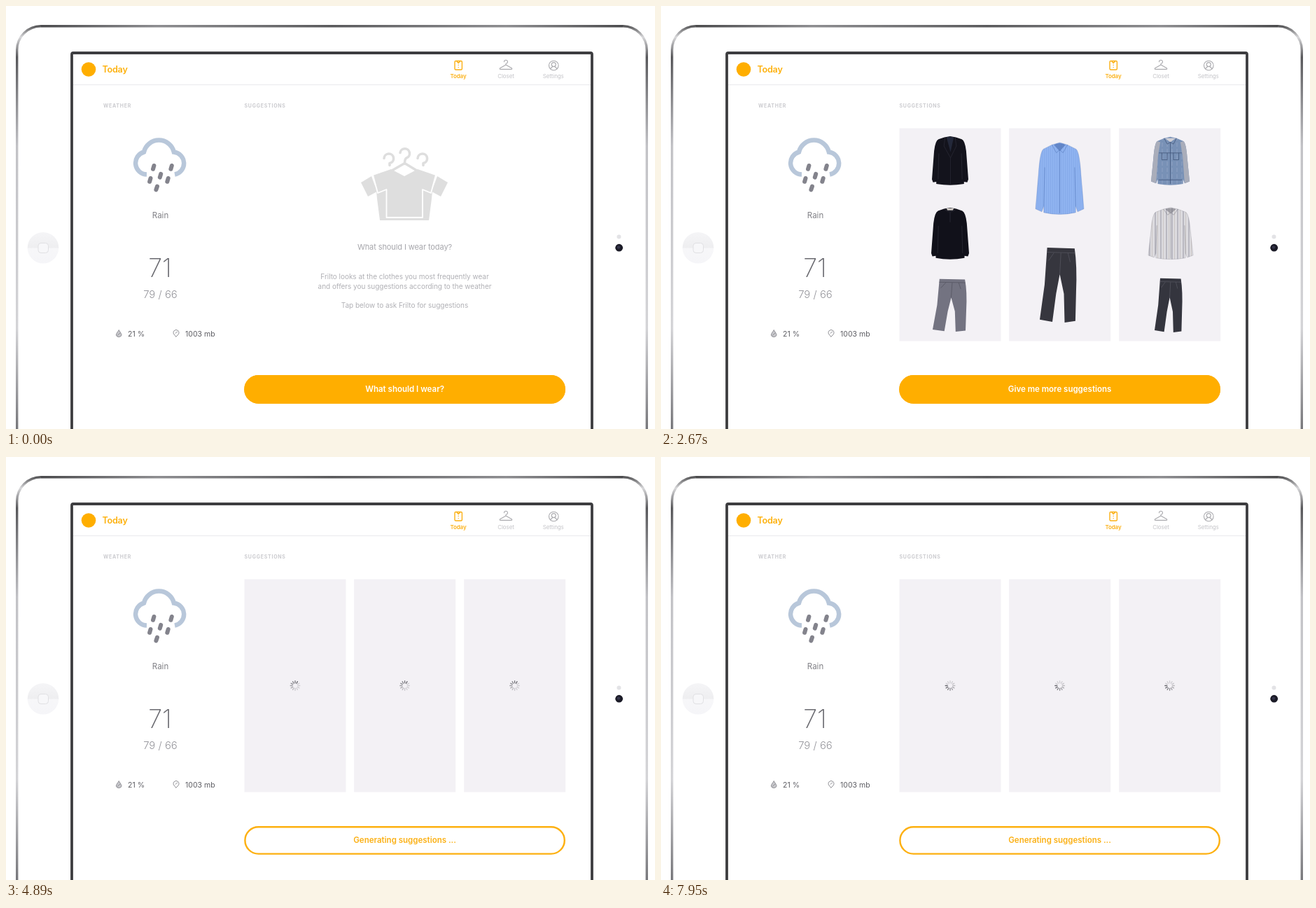
An HTML page for the animation above (7980 ms loop, 927 by 604 pixels).

```html
<!DOCTYPE html>
<html>
<head>
<meta charset="utf-8">
<style>
html, body { margin: 0; width: 100%; height: 100%; overflow: hidden; background: #fff; }
svg { display: block; width: 927px; height: 604px; font-family: Inter, Roboto, sans-serif; }
.mid { text-anchor: middle; }
.head { font-size: 7px; font-weight: 700; letter-spacing: .75px; fill: #cbcbcf; }
.tab { font-size: 8px; letter-spacing: -.1px; fill: #c4c4c8; }
.note { font-size: 10px; letter-spacing: -.03px; fill: #b0b0b5; }
.label { font-size: 11.5px; font-weight: 600; }
.stat { font-size: 10.5px; fill: #5c5c62; }
.line { fill: none; stroke-linecap: round; stroke-linejoin: round; }
</style>
</head>
<body>
<svg viewBox="0 0 927 604">
  <defs>
    <linearGradient id="side" x1="0" y1="27" x2="0" y2="604" gradientUnits="userSpaceOnUse">
      <stop offset="0" stop-color="#4a4a4c"/><stop offset=".03" stop-color="#d8d8da"/>
      <stop offset=".08" stop-color="#58585b"/><stop offset=".3" stop-color="#c2c2c6"/>
      <stop offset=".75" stop-color="#d4d4d7"/><stop offset="1" stop-color="#77777b"/>
    </linearGradient>
    <linearGradient id="edge">
      <stop offset="0" stop-color="#4a4a4c"/><stop offset=".2" stop-color="#8d8d90"/>
      <stop offset=".5" stop-color="#59595b"/><stop offset=".8" stop-color="#8d8d90"/>
      <stop offset="1" stop-color="#4a4a4c"/>
    </linearGradient>
    <linearGradient id="home" x2="0" y2="1">
      <stop offset="0" stop-color="#f5f5f7"/><stop offset=".5" stop-color="#eeeef0"/>
      <stop offset=".51" stop-color="#f7f7f9"/><stop offset="1" stop-color="#f5f5f8"/>
    </linearGradient>
    <pattern id="pin" width="3" height="8" patternUnits="userSpaceOnUse">
      <path fill="#8fb3f0" d="M0 0h3v8H0z"/><path fill="#86abea" d="M0 0h1v8H0z"/>
    </pattern>
    <pattern id="pale" width="8" height="8" patternUnits="userSpaceOnUse">
      <path fill="#dcdbdf" d="M0 0h8v8H0z"/><path fill="#b9b8c1" d="M1 0h2v8H1z"/><path fill="#cbc6c5" d="M5 0h1v8H5z"/>
    </pattern>
    <pattern id="blue" width="5" height="8" patternUnits="userSpaceOnUse">
      <path fill="#dfe6f2" d="M0 0h5v8H0z"/><path fill="#6f8fc6" d="M0 0h2.2v8H0z"/>
    </pattern>
    <pattern id="plaid" width="13" height="13" patternUnits="userSpaceOnUse">
      <path fill="#c04f57" d="M0 0h13v13H0z"/>
      <path fill="#59506f" opacity=".35" d="M0 0h4v13H0zM0 0h13v4H0zM8 0h1v13H8zM0 8h13v1H0z"/>
    </pattern>
    <pattern id="dots" width="13" height="14" patternUnits="userSpaceOnUse">
      <path fill="#f8f9fe" d="M0 0h13v14H0z"/><circle cx="3" cy="4" r="1.4" fill="#47547c"/>
      <circle cx="9" cy="10" r="1.3" fill="#a98a74"/>
    </pattern>
    <pattern id="denim" width="7" height="9" patternUnits="userSpaceOnUse">
      <path fill="#7891b6" d="M0 0h7v9H0z"/><path fill="#8399bc" d="M1 0h2v6H1z"/>
    </pattern>
  </defs>

  <g fill="none" stroke-width="3.4">
    <path stroke="url(#side)" d="M15.7 610V63A34.3 34.3 0 0 1 50 28.7M915.3 610V63A34.3 34.3 0 0 0 881 28.7"/>
    <path stroke="url(#edge)" d="M50 28.7H465.5V28.71H881"/>
  </g>
  <circle cx="53" cy="345.3" r="22.3" fill="url(#home)"/>
  <rect x="46" y="338.5" width="14.5" height="14" rx="4" fill="#f7f7f9" stroke="#e0e0e3"/>
  <circle cx="875.5" cy="329.5" r="3" fill="#e3e3e6"/>
  <circle cx="875.7" cy="345.2" r="5.4" fill="#1b1b27"/>
  <circle cx="875" cy="344.5" r="2.2" fill="#34344a"/>
  <rect x="94" y="67" width="743" height="560" rx="2" fill="#fff" stroke="#3d3d40" stroke-width="3.8"/>
  <path stroke="#eaeaec" d="M96 112.5H835"/>

  <circle cx="118" cy="90.5" r="10.3" fill="#ffae00"/>
  <text x="137.5" y="95" font-size="12.6" font-weight="600" letter-spacing="-.25" fill="#fdb10d">Today</text>
  <g class="line" stroke="#fbb014" stroke-width="1.4">
    <rect x="641" y="78.5" width="10.4" height="12.5" rx="1.5"/>
    <path d="M643.8 78.7L646.2 81.5 648.6 78.7M646.2 84.2v.2M646.2 87.4v.2"/>
  </g>
  <g class="line" stroke="#aaaaae" stroke-width="1.1">
    <path d="M711.5 79.8A2.5 2.5 0 1 1 714 82.2V84L705.6 88.8Q704.5 90.4 706.5 90.4H721.5Q723.5 90.4 722.4 88.8L714 84"/>
    <circle cx="782.3" cy="85" r="6.8"/><circle cx="782.3" cy="83.6" r="3"/>
    <path d="M777.6 89.7Q779.5 87.4 780.8 86.5M787 89.7Q785.1 87.4 783.8 86.5"/>
  </g>
  <g class="mid tab">
    <text x="646" y="102.5" style="font-weight:600;fill:#fbb014">Today</text>
    <text x="714" y="102.5">Closet</text>
    <text x="781.7" y="102.5">Settings</text>
  </g>
  <text class="head" x="139" y="144.8">WEATHER</text>
  <text class="head" x="340.5" y="144.8">SUGGESTIONS</text>

  <path fill="none" stroke="#b8c7da" stroke-width="6.5" d="M201 240.5A16.3 16.3 0 0 1 197 208.5A22 22 0 0 1 239.8 208.5A16.2 16.2 0 0 1 241 240.5"/>
  <path class="line" stroke="#83838c" stroke-width="6" d="M211.4 228l-1.4 4.8M236.8 228l-1.4 4.8M221.2 239.8l-1.4 4.8M206.5 246l-1.4 4.8M231.7 246l-1.4 4.8M216 257.5l-1.6 4.8"/>
  <text class="mid" x="220.5" y="302.5" font-size="11.5" fill="#808086">Rain</text>
  <text class="mid" x="220" y="387" font-size="36" font-weight="200" fill="#6a6a70">71</text>
  <text class="mid" x="220.5" y="417" font-size="14.9" font-weight="300" fill="#94949a">79 / 66</text>
  <text class="stat" x="174" y="471.7">21 %</text>
  <text class="stat" x="256" y="471.7">1003 mb</text>
  <g class="line" stroke="#8e8e94">
    <path fill="#c9c9cd" d="M161.2 463Q157 468.2 157.4 470A3.9 3.3 0 0 0 165 470Q165.2 468 161.2 463ZM159.5 470l3.5-3"/>
    <path d="M241 470A4 4 0 1 1 245 470L243 472.2ZM242 467.3l2.6-2.2"/>
  </g>

  <g id="intro">
    <g fill="#dedede">
      <path d="M507 252L522 243 530 265 517 272ZM631 252L616 243 608 265 621 272Z"/>
      <path d="M524 242L550 233 569 243 588 233 614 242 609 264 608 275 604 306H534L530 275 529 264Z"/>
    </g>
    <path class="line" stroke="#fff" stroke-width="1.8" d="M524 241L531 267 543.5 262V302H595V262L607 267 614 241"/>
    <path class="line" stroke="#dedede" stroke-width="3.6" d="M540 217.5a6.8 6.8 0 1 1 8 7v3M588 217.5a6.8 6.8 0 1 1 8 7v3M563 209.5a6.8 6.8 0 1 1 9 7.5q-2.5 1.5-2.5 7.5L552 234.5M569.5 224.5L586 234.5"/>
    <text class="mid" x="569.5" y="348.3" font-size="11" letter-spacing="-.1" fill="#a6a6ab">What should I wear today?</text>
    <g class="mid note">
      <text x="569.5" y="390.3">Frilto looks at the clothes you most frequently wear</text>
      <text x="569.5" y="404.3">and offers you suggestions according to the weather</text>
      <text x="569.5" y="431.3">Tap below to ask Frilto for suggestions</text>
    </g>
  </g>

  <g id="cards" fill="#f3f1f5"></g>
  <g id="spin"></g>
  <g id="first"></g>
  <g id="second"></g>

  <rect x="341.4" y="528.2" width="456.4" height="38.4" rx="19.2" fill="#fff" stroke="#fdb010" stroke-width="2.4"/>
  <rect id="solid" x="340.2" y="527" width="458.8" height="40.8" rx="20.4" fill="#ffae00"/>
  <g class="mid label" fill="#fff">
    <text id="ask" x="569.6" y="551.2">What should I wear?</text>
    <text id="more" x="569.6" y="551.2">Give me more suggestions</text>
    <text id="busy" x="569.6" y="551.2" fill="#fbb014">Generating suggestions ...</text>
  </g>
</svg>
<script>
const LOOP = 7980, STEP = 30;
const el = id => document.getElementById(id);
const centers = [413, 569.6, 726.6];

// Garment outlines in a 100 x 100 box
const LONG = 'M34 4L50 1 66 4 84 10Q91 14 94 45L100 92 87 96 83 88L83 97Q50 102 17 97L17 88 13 96 0 92 6 45Q9 14 16 10Z';
const BOXY = 'M34 2L50 0 66 2 82 6Q91 9 94 30L100 88 97 94 88 93 88 97Q50 102 12 97L12 93 3 94 0 88 6 30Q9 9 18 6Z';
const SHORT = 'M34 4L50 1 66 4 84 10Q91 14 100 40L84 47 82 42 85 97Q50 102 15 97L18 42 16 47 0 40Q9 14 16 10Z';
const SLIM = 'M20 1L94 2Q101 25 98 60L96 98 67 100 65 62 54 36 44 62 34 99 0 96 13 50Z';
const LOOSE = 'M11 1L92 1Q99 25 98 60L97 97 66 99 60 62 51 36 42 62 32 99 0 97 6 45Z';
const FOLDS = 'M19 35L17 88M81 35L83 88';

// Scale the outline itself, so that patterns keep their size
function fit(shape, sx, sy) {
  let i = 0;
  return shape.replace(/\d+/g, n => (n * (i++ % 2 ? sy : sx)).toFixed(1));
}
function piece(shape, x, y, w, h, fill, detail) {
  const sx = w / 100, sy = h / 100;
  return `<g transform="translate(${x} ${y})"><path d="${fit(shape, sx, sy)}" fill="${fill}"/>` +
    `<g transform="scale(${sx} ${sy})">${detail}</g></g>`;
}
const stroke = (d, color, opacity = .45) =>
  `<path d="${d}" fill="none" stroke="${color}" stroke-opacity="${opacity}" vector-effect="non-scaling-stroke"/>`;

const shirt = (x, y, w, h, fill, dark, shape = LONG) => piece(shape, x, y, w, h, fill,
  `<path d="M38 4Q50 0 62 4L50 13Z" fill="${dark}" fill-opacity=".6"/>` + stroke(shape, dark, .25) +
  stroke('M34 4L43 15 50 11 57 15 66 4M50 13V98', dark) + stroke(shape === LONG ? FOLDS : 'M18 42L21 25M82 42L79 25', dark));
const blazer = (x, y, w, h) => piece(BOXY, x, y, w, h, '#13131c',
  '<path d="M40 2Q50 0 60 2L51 32Z" fill="#23283a"/>' + stroke('M36 3L33 20 51 44 67 20 64 3M51 44V98', '#30303c', .6) + stroke(FOLDS, '#383844', .5));
const sweater = (x, y, w, h) => piece(BOXY, x, y, w, h, '#11111a',
  '<path d="M40 1H60L57 5H43Z" fill="#cfcac6"/>' + stroke('M36 3Q50 13 64 3M50 9V28', '#383844', .6) + stroke(FOLDS, '#383844', .5));
const pants = (shape, x, y, w, h, fill, light) => piece(shape, x, y, w, h, fill,
  stroke('M19 7L95 8M57 8L54 36M24 18L38 8M82 20L76 8', light, .45));
const jacket = (x, y, w, h) => piece(LONG, x, y, w, h, 'url(#denim)',
  '<path d="M16 10Q9 14 6 45L0 92 13 96 18 40 24 12ZM84 10Q91 14 94 45L100 92 87 96 82 40 76 12Z" fill="#a9adba"/>' +
  '<path d="M36 4H64L50 12Z" fill="#cfcfd6"/>' +
  stroke('M34 4L42 16 50 12 58 16 66 4M50 12V97M20 34H80M19 89H81M28 34V48H42V34M58 34V48H72V34', '#3f5377', .75));

el('cards').innerHTML = [340.5, 497.2, 654.2].map(x => `<rect x="${x}" y="174.5" width="145" height="304"/>`).join('');
el('first').innerHTML =
  blazer(387, 186, 52, 70) + sweater(386, 288, 54, 74) + pants(SLIM, 388, 389, 49, 76, '#737381', '#3f3f4b') +
  shirt(535, 194, 69, 104, 'url(#pin)', '#4669ad') + pants(SLIM, 541, 344, 53, 108, '#36363e', '#6c6c76') +
  jacket(700, 186, 55, 70) + shirt(696, 287, 64, 75, 'url(#pale)', '#76757f') + pants(SLIM, 705, 388, 40, 78, '#34353e', '#6c6c76');
el('second').innerHTML =
  shirt(374, 194, 79, 103, 'url(#plaid)', '#5b2d3b') + pants(LOOSE, 387, 345, 52, 107, '#9a9a9e', '#65656b') +
  shirt(530, 194, 82, 104, 'url(#blue)', '#3c598f') + pants(LOOSE, 547, 346, 47, 106, '#31416f', '#15203f') +
  blazer(700, 186, 53, 70) + shirt(697, 288, 53, 74, 'url(#dots)', '#8f95ab', SHORT) + pants(LOOSE, 708, 389, 37, 76, '#2e3d68', '#15203f');
el('spin').innerHTML = centers.map(x => `<g transform="translate(${x} 326.5)" stroke-width="1.3" stroke-linecap="round">` +
  Array.from({length: 12}, (_, i) => `<path transform="rotate(${i * 30})" d="M0-3.8V-6.8" stroke="#66666c"/>`).join('') + '</g>').join('');
const spokes = [...el('spin').querySelectorAll('path')];

// Waiting periods: start, end of the turning, first leading spoke
const waits = [[1020, 1770, 5], [4350, 4890, 7], [7410, 7980, 3]];
const show = (id, v) => el(id).setAttribute('opacity', Math.max(0, Math.min(1, v)).toFixed(3));

function draw(now) {
  const t = Math.floor((now % LOOP) / STEP) * STEP;
  const since = at => Math.max(0, Math.min(1, (t - at + STEP) / 150));
  const started = since(1020);
  const a = since(1920) - since(4350), b = since(5070) - since(7410);
  const wait = started - a - b;
  show('intro', 1 - started);
  show('ask', 1 - started);
  show('cards', started);
  show('first', a);
  show('second', b);
  show('more', a + b);
  show('spin', wait);
  show('busy', wait);
  show('solid', 1 - wait);

  const [from, to, lead] = waits.filter(w => t >= w[0]).pop() || waits[0];
  const head = lead + Math.floor(Math.max(0, Math.min(t, to) - from) * 12 / 1000);
  spokes.forEach((s, i) => {
    const behind = (head - i % 12 + 120) % 12;
    s.setAttribute('opacity', Math.max(.25, 1 - behind * .1));
  });
}

const begin = performance.now();
function tick() {
  draw(performance.now() - begin);
  requestAnimationFrame(tick);
}
tick();
</script>
</body>
</html>
```
